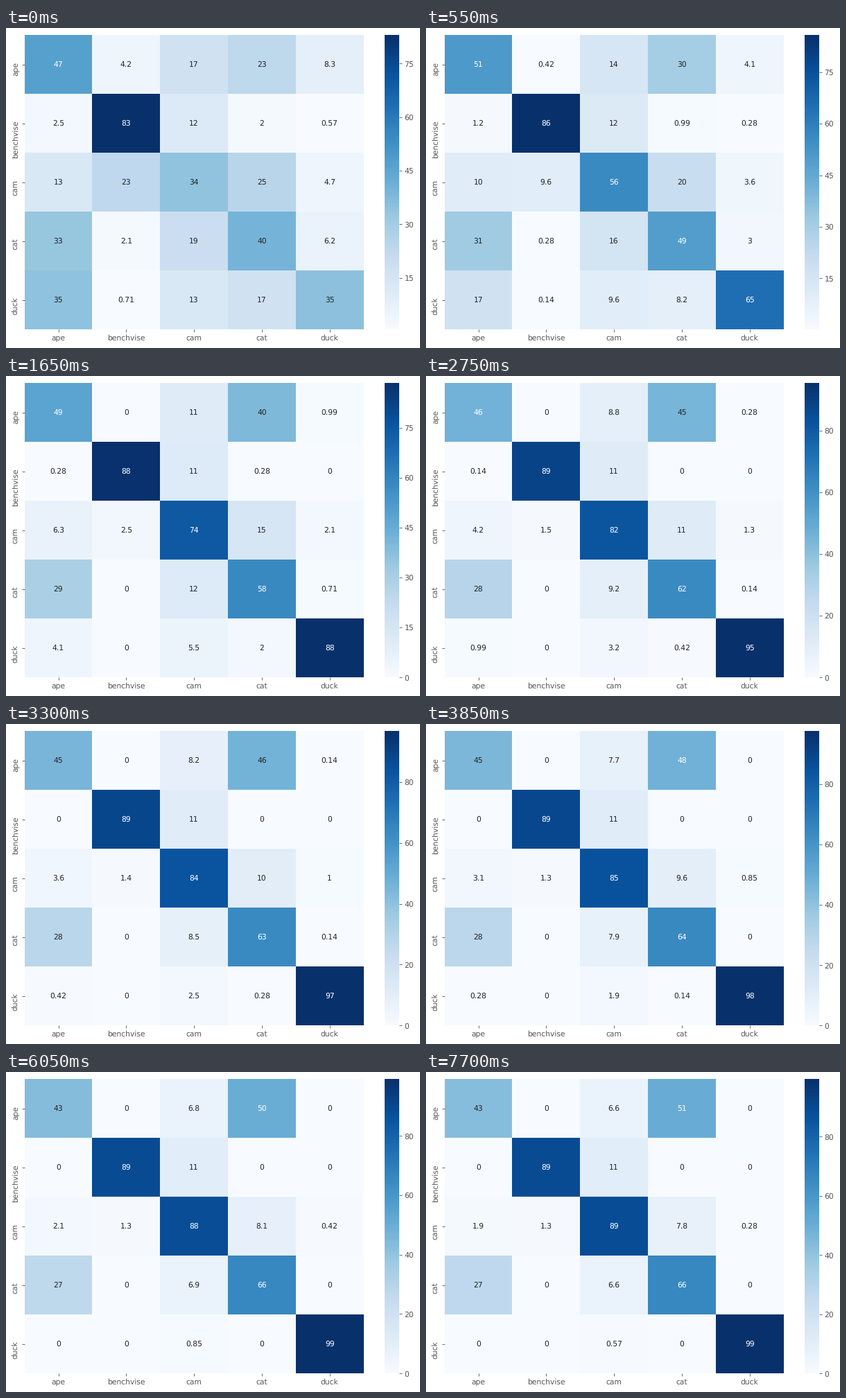
A matplotlib script that plays this animation: 597 px wide and 462 px high, repeating every 8 s.

```python
import numpy as np
import matplotlib.pyplot as plt
from matplotlib.animation import FuncAnimation
from matplotlib.ticker import MaxNLocator

W, H, DPI = 597, 462, 64
FRAME_MS, LOOP_MS, STEP_MS = 50, 8000, 550
GREY = "#555555"
NAMES = ["ape", "benchvise", "cam", "cat", "duck"]
UNIT = 100 / 707  # share of one sample in a row, in percent

# Mistakes in percent at the start and after training; hits fill each row to 100.
START = np.array([[0, 4.2, 17, 23.3, 8.3],
                  [2.5, 0, 12, 2, .57],
                  [13, 23, 0, 25, 4.7],
                  [33, 2.1, 19, 0, 6.2],
                  [34.6, .71, 12.8, 16.7, 0]])
END = np.array([[0, 0, 6.4, 51, 0],
                [0, 0, 11, 0, 0],
                [1.7, 1.3, 0, 7.5, .28],
                [27, 0, 6.4, 0, 0],
                [0, 0, .42, 0, 0]])

# Mistakes that vanish fade faster; the benchvise is soon told apart.
RATE = np.where(END > 0, .3, .71)
RATE[:, 1] *= 3.2


def pt(px):
    return px * 72 / DPI


def add_axes(x0, y0, x1, y1):
    return fig.add_axes([x0 / W, 1 - y1 / H, (x1 - x0) / W, (y1 - y0) / H])


def matrix(step):
    errors = END + (START - END) * np.exp(-RATE * step)
    errors = np.where(errors < 1, np.round(errors / UNIT) * UNIT, errors)
    return errors + np.diag(100 - errors.sum(axis=1))


def text_color(rgba):
    rgb = np.array(rgba[:3])
    linear = np.where(rgb <= .03928, rgb / 12.92, ((rgb + .055) / 1.055) ** 2.4)
    return ".15" if linear @ [.2126, .7152, .0722] > .408 else "white"


# Zero line width keeps the cell edges on whole pixels.
plt.rcParams.update({"font.family": "DejaVu Sans", "font.size": pt(10.8),
                     "text.hinting": "none", "patch.linewidth": 0})
fig = plt.figure(figsize=(W / DPI, H / DPI), dpi=DPI, facecolor="white")
ax = add_axes(26.6, 10.3, 515.6, 435.2)
cax = add_axes(545.6, 10.3, 567, 435.2)

mesh = ax.pcolormesh(matrix(0), cmap="Blues")
ax.invert_yaxis()
centres = np.arange(5) + .5
ax.set_xticks(centres, NAMES)
ax.set_yticks(centres, NAMES, rotation=90)
ax.spines[:].set_visible(False)

bar = fig.colorbar(mesh, cax=cax, ticks=MaxNLocator(6))
bar.outline.set_visible(False)
for a in (ax, cax):
    a.tick_params(length=pt(3.8), width=pt(.87), pad=pt(3.8),
                  color=GREY, labelcolor=GREY)

labels = [ax.text(x, y, "", ha="center", va="center")
          for y in centres for x in centres]


def draw(frame):
    values = matrix(frame * FRAME_MS // STEP_MS)
    mesh.set_array(values)
    mesh.set_clim(values.min(), values.max())
    for label, value in zip(labels, values.flat):
        label.set_text(f"{value:.2g}")
        label.set_color(text_color(mesh.to_rgba(value)))
    return [mesh, *labels]


anim = FuncAnimation(fig, draw, frames=LOOP_MS // FRAME_MS, interval=FRAME_MS,
                     init_func=lambda: draw(0), repeat=True, repeat_delay=0,
                     blit=False)
plt.show()
```
